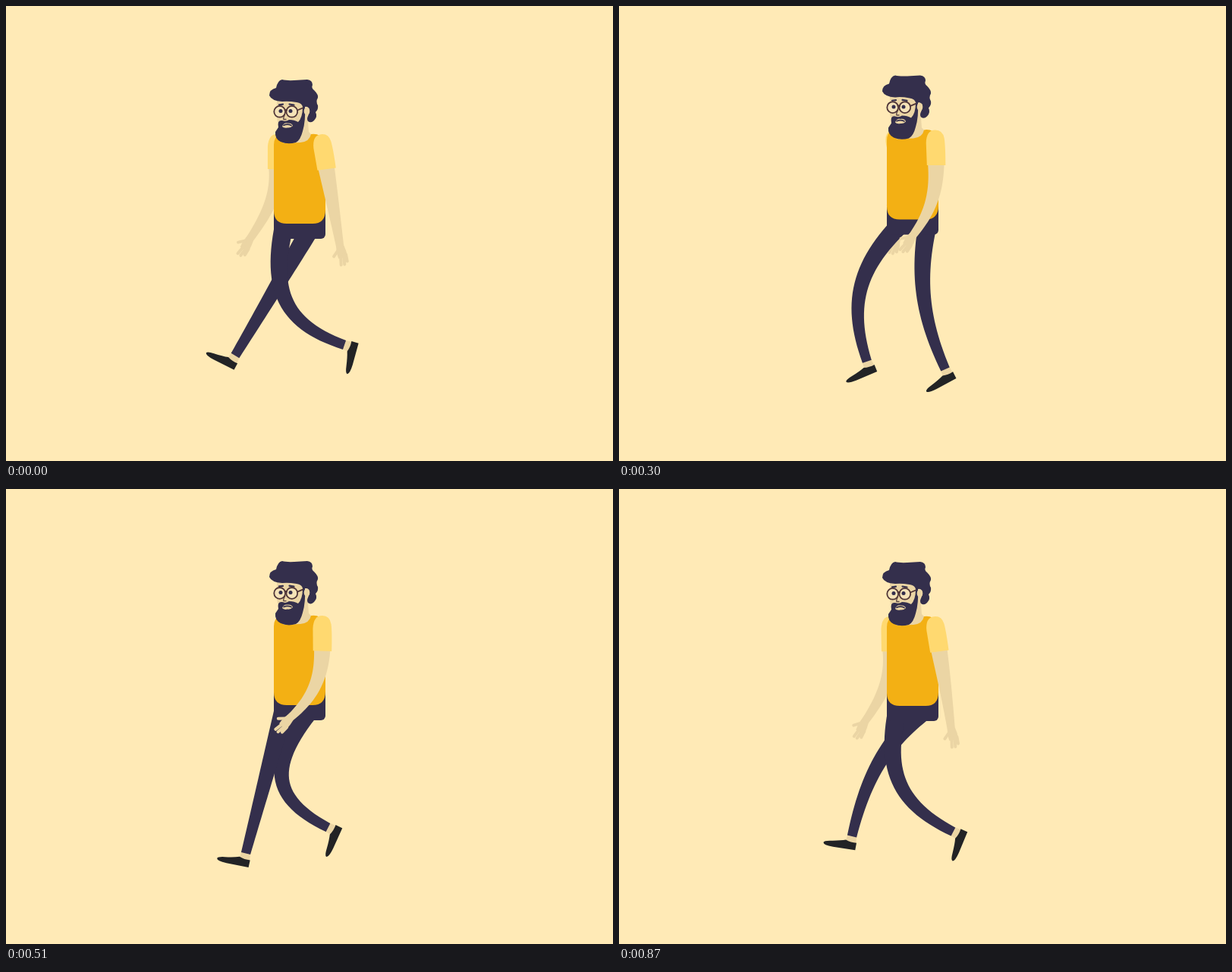
An HTML page for the animation above (0.9 s loop, 800 px wide and 600 px high).

```html
<!DOCTYPE html>
<html lang="en">
<head>
<meta charset="utf-8">
<title>Walking man</title>
<style>
  html, body { margin: 0; width: 100%; height: 100%; overflow: hidden; background: #ffeab6; }
  svg { display: block; width: 800px; height: 600px; }
  .navy { fill: #342f4c; }
  .skin { fill: #ebd5a4; }
  .sleeve { fill: #ffd970; }
  .shoe { fill: #222325; }
  .finger { fill: none; stroke: #ebd5a4; stroke-width: 4; stroke-linecap: round; stroke-linejoin: round; }
  .frame { fill: none; stroke: #4f3537; stroke-width: 1.8; stroke-linecap: round; }
</style>
</head>
<body>
<svg viewBox="0 0 800 600">
  <defs>
    <path id="sleeve" class="sleeve" d="M-12 31.5 L-13 2 Q-12.5 -15 -1 -15 Q9 -15 11 -4 Q12.5 6 12.5 31.5Z"/>
    <g id="hand">
      <path class="skin" d="M-5 -3 L5 -3 Q8 4 9 12 L-3 14 Q-6 5 -5 -3Z"/>
      <path class="finger" d="M-3 3 L-9 11 M0 10 L0 22.5 M4 9 L4.6 22 M7 9 L8.4 18"/>
    </g>
    <g id="foot">
      <path class="skin" d="M-6 -3 L6 -3 L7 10 L-7 10Z"/>
      <path class="shoe" d="M7.5 7.5 V17.2 L-22 18 Q-35 18 -35.5 14.6 Q-35 12 -26 10.6 Q-14 8.5 -7 6 Q0 8.5 7.5 7.5Z"/>
    </g>
  </defs>
  <rect width="800" height="600" fill="#ffeab6"/>

  <g id="farArm"><path class="skin"/><use href="#hand"/><use href="#sleeve"/></g>
  <g id="rightLeg"><use href="#foot"/><path class="navy"/></g>
  <g id="leftLeg"><use href="#foot"/><path class="navy"/></g>

  <g id="body">
    <rect class="navy" x="353" y="262" width="68" height="45" rx="6"/>
    <path fill="#f3b014" d="M353 183 Q353 172 361 170 L402 169 Q413 167 421 178 V269 Q421 287 404 287 H370 Q353 287 353 270Z"/>
    <path class="skin" d="M386 140 H397 L399 166 L402 169 Q400 179 388 180 L366 181 L362 170Z"/>
    <path class="skin" d="M357 124 H394 V160 H362 Q356 152 357 143Z"/>
    <path class="navy" d="M347 118 Q347 110 356 108 Q358 98 364 97 Q369 98.500 380 98 L397 97 Q404 98 404 104 Q402 108 406 111 Q412 117 411 121 Q408 126 411 131 Q412 136 408 140 Q411 146 406 151 Q402 155 398 152 Q396 149 398 145 Q400 141 400 137 Q398 132 394 133 L391 133 Q390 128 383 127 Q372 125 364 126 Q350 125 347 118Z"/>
    <path class="navy" d="M394 132 Q395 152 391 165 Q388 177 382 180 Q371 183 362 179 Q354 175 355 166 L359 160 Q357 150 364 151 Q369 153 373 150 Q380 150 385 153 Q391 147 391 133Z"/>
    <ellipse class="skin" cx="396.500" cy="138.500" rx="3.800" ry="5.300"/>
    <path class="skin" d="M364 159 Q366 153.500 371 154.500 Q377 154 378 158 Q375 161 371 160.500 Q366 161.500 364 159Z"/>
    <path fill="none" stroke="#342f4c" stroke-width="1.700" stroke-linecap="round" d="M366 157.300 Q371 155 376 157.500"/>
    <path fill="none" stroke="#342f4c" stroke-width="2.200" stroke-linecap="round" d="M360 130.300 L365 129.700 M373.500 129.500 L379.500 130.500"/>
    <path fill="none" stroke="#5d4844" stroke-width="1.400" stroke-linecap="round" d="M367.500 143 Q365 148 366 149.500 L369 149.500"/>
    <circle cx="360.700" cy="139.300" r="7.400" fill="#f5e3b8"/>
    <circle cx="376.800" cy="139.300" r="7.400" fill="#f5e3b8"/>
    <circle class="navy" cx="362" cy="138.500" r="2.500"/>
    <circle class="navy" cx="375" cy="138.500" r="2.500"/>
    <circle class="frame" cx="360.700" cy="139.300" r="7.400"/>
    <circle class="frame" cx="376.800" cy="139.300" r="7.400"/>
    <path class="frame" d="M367.500 137.500 Q369 136.300 370 137.500 M384 137.500 L391 134.500"/>
  </g>

  <g id="nearArm"><path class="skin"/><use href="#hand"/><use href="#sleeve"/></g>
</svg>
<script>
const LOOP = 900, STEP = 30;

// time, vertical lift
const bobKeys = [
  [0, 0], [105, -4], [210, -7.6], [390, -1.9], [450, -0.4],
  [510, -1.9], [630, -6.5], [680, -7.2], [750, -4.8], [870, -1]
];
// time, hip x, knee x, knee y, ankle x, ankle y, foot turn
const rightLegKeys = [
  [0, 399, 351, 379, 302, 461, 28],
  [60, 401, 366, 387, 331, 480, 13],
  [210, 408, 408.5, 385, 409.5, 483, 0],
  [300, 406, 402, 386, 430, 479, -27],
  [390, 400, 378, 381, 436.5, 458, -58],
  [450, 399, 371, 383, 437, 450, -64],
  [510, 398, 364, 384, 424.5, 446.5, -64],
  [630, 391, 344.5, 376, 383, 449, -44],
  [750, 397, 333, 361, 342.5, 453, -23],
  [870, 398, 341, 364, 307, 458, 10.5]
];
const leftLegKeys = [
  [0, 365, 371, 393, 446, 447, -73],
  [90, 365, 350, 388, 418, 445, -64],
  [210, 366, 322, 376, 361.5, 459, -41],
  [390, 368, 321, 377, 297.5, 472, 3],
  [450, 366, 322, 382, 280, 467, 25],
  [510, 365, 341, 386, 316, 480.5, 12.5],
  [630, 369, 379, 387, 389.5, 483, -7],
  [750, 373, 393, 384, 426, 476, -23.5],
  [870, 366, 371, 390, 440.5, 452, -66]
];
// time, shoulder x, sleeve turn, elbow x, elbow y, wrist x, wrist y, hand turn
const nearArmKeys = [
  [0, 418, -8, 431.5, 266, 440.5, 319, -3],
  [210, 418.5, -3, 418.5, 257, 401.5, 307, 24],
  [390, 417, 2, 405, 262, 373, 303, 56],
  [450, 417, 2.5, 403, 262, 368, 302, 57],
  [510, 417.5, 1.5, 406, 262, 373, 303, 52],
  [630, 419, -4, 420, 257, 402, 306, 28],
  [750, 419, -8, 427.5, 262, 423, 313, 8],
  [870, 418, -7.5, 430.5, 265, 438, 318, -2]
];
const farArmKeys = [
  [0, 358, 2, 349, 258, 320, 309, 40],
  [210, 361, -8, 366, 250, 354, 301, 24],
  [390, 367, -15, 386, 254, 374, 308, 22],
  [450, 367, -15, 388, 254, 378, 308, 18],
  [510, 367, -13, 386, 254, 375, 306, 18],
  [630, 363, -10, 368, 252, 357, 303, 22],
  [750, 360.5, -5, 360, 255, 340, 309, 25],
  [870, 358.5, 1, 351, 258, 323, 308, 36]
];

const $ = id => document.getElementById(id);
const turn = (x, y, deg) => `translate(${x.toFixed(2)} ${y.toFixed(2)}) rotate(${deg.toFixed(2)})`;

// Smooth looping interpolation through unevenly spaced keys
function pose(keys, t) {
  const n = keys.length;
  let i = n - 1;
  while (i > 0 && keys[i][0] > t) i--;
  const key = k => keys[(k + n) % n];
  const time = k => key(k)[0] + Math.floor(k / n) * LOOP;
  const h0 = time(i) - time(i - 1), h = time(i + 1) - time(i), h2 = time(i + 2) - time(i + 1);
  const u = (t - time(i)) / h;
  return key(i).slice(1).map((b, c) => {
    const a = key(i - 1)[c + 1], d = key(i + 1)[c + 1], e = key(i + 2)[c + 1];
    const s0 = (b - a) / h0, s = (d - b) / h, s2 = (e - d) / h2;
    const m1 = (s0 * h + s * h0) / (h0 + h) * h;
    const m2 = (s * h2 + s2 * h) / (h + h2) * h;
    const p = d - b;
    return b + u * (m1 + u * (3 * p - 2 * m1 - m2 + u * (m1 + m2 - 2 * p)));
  });
}

// Tapered limb from a to b that bends through point k
function limb(a, k, b, w0, w1) {
  const pull = 0.72, left = [], right = [];
  const ctrl = [0, 1].map(c => (k[c] - 0.23 * (a[c] + b[c])) / 0.54);
  const c1 = ctrl.map((v, c) => a[c] + pull * (v - a[c]));
  const c2 = ctrl.map((v, c) => b[c] + pull * (v - b[c]));
  for (let i = 0; i <= 28; i++) {
    const u = i / 28, v = 1 - u;
    const [x, y] = [0, 1].map(c =>
      v * v * v * a[c] + 3 * v * v * u * c1[c] + 3 * v * u * u * c2[c] + u * u * u * b[c]);
    const [dx, dy] = [0, 1].map(c =>
      v * v * (c1[c] - a[c]) + 2 * v * u * (c2[c] - c1[c]) + u * u * (b[c] - c2[c]));
    const r = (w0 + (w1 - w0) * u) / 2 / Math.hypot(dx, dy);
    left.push(`${(x - dy * r).toFixed(2)} ${(y + dx * r).toFixed(2)}`);
    right.unshift(`${(x + dy * r).toFixed(2)} ${(y - dx * r).toFixed(2)}`);
  }
  return "M" + left.concat(right).join("L") + "Z";
}

function drawLeg(id, keys, t, lift) {
  const [foot, pants] = $(id).children;
  const [hx, kx, ky, ax, ay, rot] = pose(keys, t);
  pants.setAttribute("d", limb([hx, 297 + lift], [kx, ky], [ax, ay], 24.5, 12.5));
  foot.setAttribute("transform", turn(ax, ay, rot));
}

function drawArm(id, keys, t, lift) {
  const [arm, hand, sleeve] = $(id).children;
  const [sx, tilt, kx, ky, wx, wy, rot] = pose(keys, t);
  const sy = 184 + lift, rad = tilt * Math.PI / 180;
  const cuff = [sx - 29 * Math.sin(rad), sy + 29 * Math.cos(rad)];
  arm.setAttribute("d", limb(cuff, [kx, ky], [wx, wy], 21.5, 10));
  hand.setAttribute("transform", turn(wx, wy, rot));
  sleeve.setAttribute("transform", turn(sx, sy, tilt));
}

function draw(t) {
  const [lift] = pose(bobKeys, t);
  $("body").setAttribute("transform", `translate(0 ${lift.toFixed(2)})`);
  drawLeg("rightLeg", rightLegKeys, t, lift);
  drawLeg("leftLeg", leftLegKeys, t, lift);
  drawArm("farArm", farArmKeys, t, lift);
  drawArm("nearArm", nearArmKeys, t, lift);
}

let start;
function tick(now) {
  if (start === undefined) start = now;
  draw(Math.floor((now - start) % LOOP / STEP) * STEP);
  requestAnimationFrame(tick);
}
draw(0);
requestAnimationFrame(tick);
</script>
</body>
</html>
```
